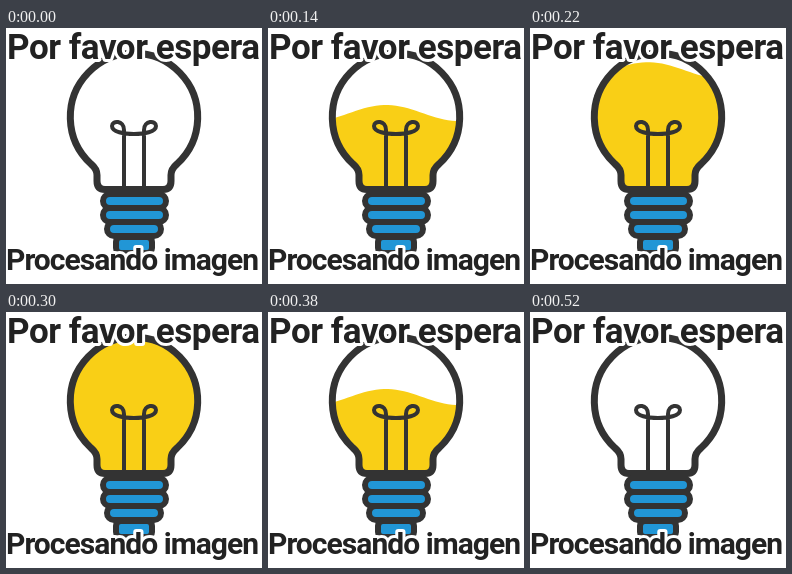
An HTML page that plays this animation: 256 px wide and 256 px high, repeating every 0.54 s.

```html
<!DOCTYPE html>
<html lang="es">
<head>
<meta charset="utf-8">
<style>
  html, body { margin: 0; width: 100%; height: 100%; overflow: hidden; background: #fff; }
  svg { display: block; width: 100%; height: 100%; }
  .line { fill: none; stroke: #333; stroke-linecap: round; stroke-linejoin: round; }
  .band { fill: #2196d6; stroke: #333; stroke-width: 6; }
  text {
    font-family: Roboto, "Liberation Sans", sans-serif; font-weight: 700; font-stretch: 75%;
    fill: #222; stroke: #fff; stroke-width: 6; stroke-linejoin: round;
    paint-order: stroke;
  }
</style>
</head>
<body>
<svg viewBox="0 0 256 256">
  <defs>
    <path id="glass" d="M99 161.5Q91 161.5 91 153V147Q91 141 85 136A63.7 63.7 0 1 1 171 136Q165 141 165 147V153Q165 161.5 157 161.5Z"/>
    <clipPath id="inside"><use href="#glass"/></clipPath>
  </defs>
  <path id="liquid" fill="#f9cf16" clip-path="url(#inside)"/>
  <path class="line" stroke-width="4" d="M118 162V102C118 92 106 92 106 98C106 104 118 106 128 106S150 104 150 98C150 92 138 92 138 102V162"/>
  <use class="line" href="#glass" stroke-width="7"/>
  <g class="band">
    <rect x="97" y="166" width="63" height="14" rx="7"/>
    <rect x="97" y="180" width="63" height="14" rx="7"/>
    <rect x="101" y="194" width="54" height="14" rx="7"/>
    <rect x="110" y="209" width="36" height="16" rx="5"/>
  </g>
  <text x="1" y="31" font-size="35">Por favor espera</text>
  <text x="0" y="242" font-size="30">Procesando imagen</text>
</svg>
<script>
  const LOOP = 540, STEP = 20, END = 520;
  const CREST = 118, PERIOD = 145, HEIGHT = 8;
  const liquid = document.getElementById('liquid');
  const mix = (a, b, k) => a + (b - a) * Math.min(1, Math.max(0, k));

  // Track each line of text so that it spans the stage
  for (const line of document.querySelectorAll('text')) {
    const gap = (253 - line.getComputedTextLength()) / (line.textContent.length - 1);
    line.style.letterSpacing = gap + 'px';
  }

  // Mean height of the surface: fill, hold, then drain
  function level(t) {
    if (t < 300) return mix(160, 10, t / 280);
    if (t < 380) return mix(10, 85, (t - 300) / 80);
    return mix(85, 160, (t - 380) / 140);
  }

  function surface(t) {
    if (t < STEP || t >= END) return '';
    const y = level(t);
    let d = 'M56 170';
    for (let x = 56; x <= 200; x += 4) {
      const h = HEIGHT * Math.cos((x - CREST) / PERIOD * 2 * Math.PI);
      d += `L${x} ${(y - h).toFixed(2)}`;
    }
    return d + 'V170Z';
  }

  function draw() {
    const t = performance.now() % LOOP;
    liquid.setAttribute('d', surface(Math.floor(t / STEP) * STEP));
    requestAnimationFrame(draw);
  }
  draw();
</script>
</body>
</html>
```
